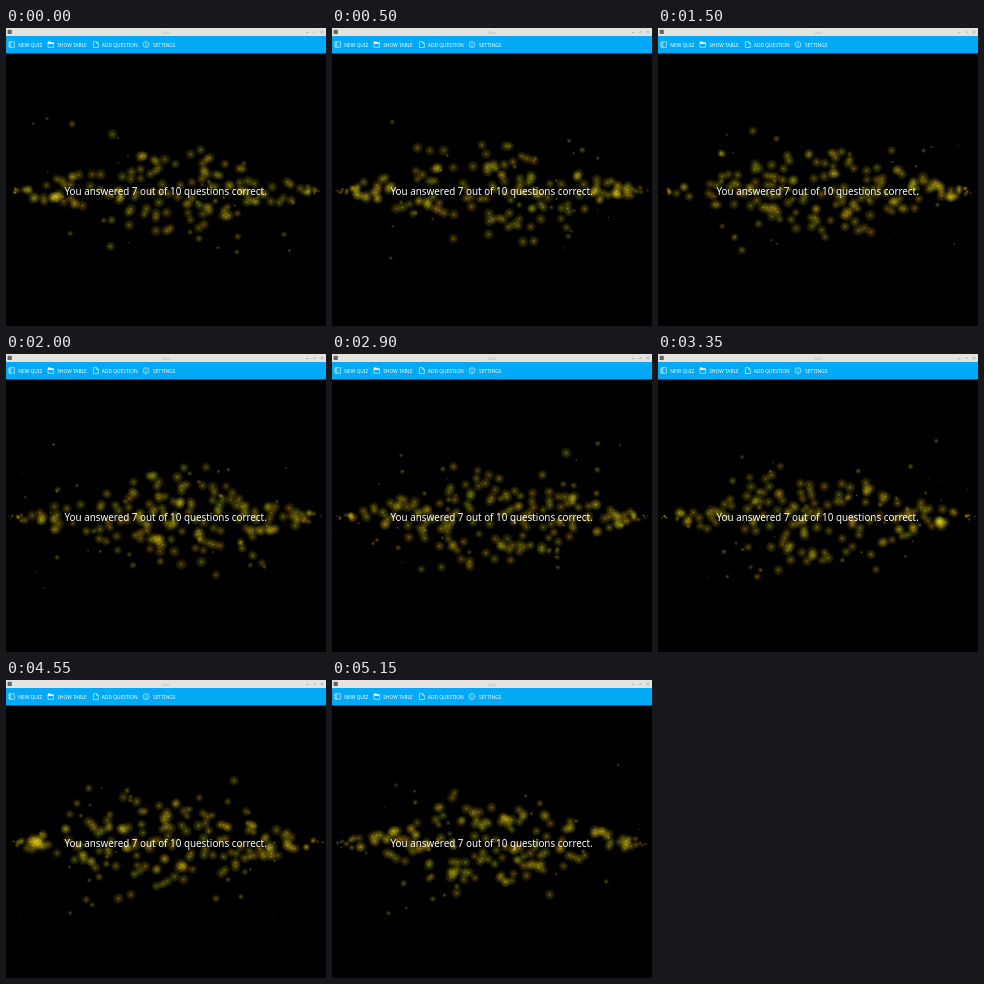
Write an HTML page with a canvas that moves like this. It is 320 by 298 pixels and loops after 5200 ms.

```html
<!DOCTYPE html>
<html lang="en">
<head>
<meta charset="utf-8">
<title>Quiz</title>
<style>
  html, body { margin: 0; width: 100%; height: 100%; overflow: hidden; background: #000; }
  canvas, svg { position: absolute; left: 0; top: 0; width: 320px; height: 298px; }
  text { font-family: "Noto Sans", "Open Sans", sans-serif; fill: #fff; }
  .menu text { font-size: 4.85px; }
  .icon { fill: none; stroke: #fff; stroke-width: .55; }
</style>
</head>
<body>
<canvas width="320" height="298"></canvas>
<svg viewBox="0 0 320 298">
  <rect width="320" height="8" fill="#e4e3df"/>
  <rect x="1.6" y="1.8" width="4.2" height="4.2" fill="#66665f"/>
  <text x="160" y="5.6" text-anchor="middle" style="font-size:4px;fill:#b5b4b0">Quiz</text>
  <path d="M300 4.6h2.4M307.4 4.8l1.2-1.4 1.2 1.4M314.6 2.8l2.6 2.6m0-2.6l-2.6 2.6" fill="none" stroke="#94938e" stroke-width=".6"/>
  <rect y="8" width="320" height="17.5" fill="#03a9f4"/>
  <g class="icon">
    <path d="M3.2 13.7h5.2v5.6H3.2zM4.8 13.7v5.6M2.2 15.2h1.6M2.2 17.8h1.6"/>
    <path d="M42 15h5.6v4.3H42z"/>
    <path d="M41.8 13.4h2.6l.8 1.1h2.6v1.2h-6z" fill="#fff" stroke="none"/>
    <path d="M87.4 13.6h3.2l1.8 1.8v4.1h-5zM90.6 13.6v1.8h1.8"/>
    <circle cx="140" cy="16.6" r="2.9"/>
    <path d="M140 14.8v.8M140 16.2v2.2"/>
  </g>
  <g class="menu">
    <text x="12.3" y="18.7">NEW QUIZ</text>
    <text x="51.2" y="18.7">SHOW TABLE</text>
    <text x="95.8" y="18.7">ADD QUESTION</text>
    <text x="147" y="18.7">SETTINGS</text>
  </g>
  <text x="58.5" y="166.9" style="font-size:9.85px">You answered 7 out of 10 questions correct.</text>
</svg>
<script>
const LOOP = 5200, STEP = 50, LIFE = 3200, COUNT = 540;
const ctx = document.querySelector('canvas').getContext('2d');

let seed = 20;
function random() {
  seed = (seed * 1664525 + 1013904223) % 4294967296;
  return seed / 4294967296;
}
const between = (a, b) => a + (b - a) * random();

// Two emitters face each other; each throws dots in a narrow cone.
const dots = Array.from({ length: COUNT }, (_, i) => {
  const angle = between(-.27, .27), speed = between(.066, .103);
  return {
    side: i % 2,
    birth: between(-LIFE, LOOP),
    vx: speed * Math.cos(angle),
    vy: speed * Math.sin(angle),
    size: between(5, 6.2),
    color: [between(125, 165), between(110, 145), between(0, 20)].map(Math.round)
  };
});

function drawDot(dot, time) {
  const age = time - dot.birth, life = age / LIFE;
  if (life <= 0 || life >= 1) return;
  // Grow during the first tenth of life, shrink during the last quarter.
  const r = dot.size * Math.min(1, life * 10, (1 - life) * 4);
  const x = dot.side ? 320 - dot.vx * age : dot.vx * age;
  const y = 163 + dot.vy * age;
  const glow = ctx.createRadialGradient(x, y, 0, x, y, r);
  const stop = (at, alpha) => glow.addColorStop(at, `rgba(${dot.color},${alpha})`);
  stop(0, .8);
  stop(.14, .58);
  stop(.3, .36);
  stop(.65, .22);
  stop(1, 0);
  ctx.fillStyle = glow;
  ctx.fillRect(x - r, y - r, 2 * r, 2 * r);
}

function frame(now) {
  const time = Math.floor(now % LOOP / STEP) * STEP;
  ctx.clearRect(0, 0, 320, 298);
  ctx.globalCompositeOperation = 'screen';
  for (const dot of dots) drawDot(dot, time);
  requestAnimationFrame(frame);
}
requestAnimationFrame(frame);
</script>
</body>
</html>
```
